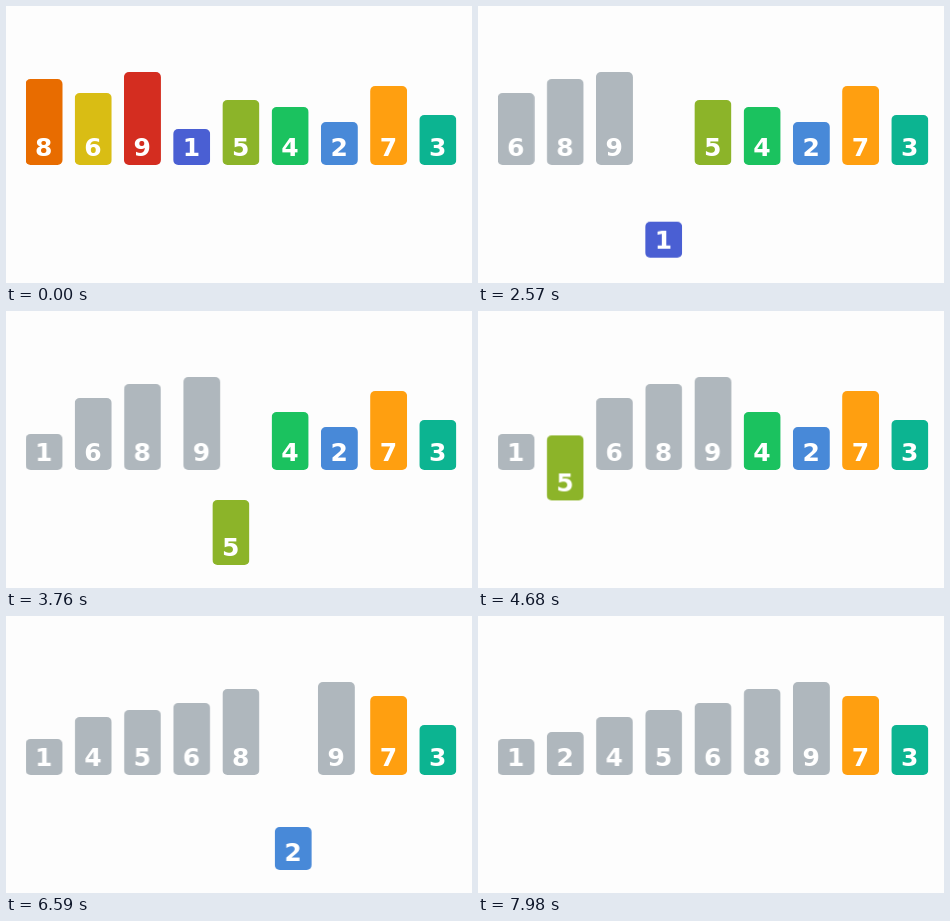
An HTML page that plays this animation: 466x277 px, repeating every 8000 ms.

```html
<!DOCTYPE html>
<html lang="en">
<head>
<meta charset="utf-8">
<title>Insertion sort</title>
<style>
  html, body { margin: 0; width: 100%; height: 100%; overflow: hidden; background: #fdfdfd; }
  #stage { position: relative; width: 466px; height: 277px; overflow: hidden; }
  .bar {
    position: absolute; left: 0; width: 36.6px; border-radius: 5px;
    color: #fff; font: bold 25px/25px "DejaVu Sans", Verdana, sans-serif; text-align: center;
  }
  .bar span { position: absolute; left: 0; right: 0; bottom: 4.5px; }
</style>
</head>
<body>
<div id="stage"></div>
<script>
const LOOP = 8000, GREY = '#afb7bd', EASE = 'cubic-bezier(.37, 0, .63, 1)';
const LEFT = 19.5, PITCH = 49.23, FLOOR = 159, DEPTH = 95;
const DROP = 140, SHIFT = 267, COMPARE = 122, RISE = 125, FADE = 30;

const order = [8, 6, 9, 1, 5, 4, 2, 7, 3];
const colors = {
  1: '#4a5fd3', 2: '#4889d8', 3: '#0cb491', 4: '#1bc25f', 5: '#8cb429',
  6: '#d9bd14', 7: '#ff9f10', 8: '#e86c00', 9: '#d42d20'
};
// Start time of each insertion, for the second bar onwards
const starts = [1390, 1990, 2445, 3541, 4767, 6227];

const stage = document.getElementById('stage');
const bars = {};

order.forEach((n, slot) => {
  const el = document.createElement('div');
  const height = 29 + 7.13 * n;
  el.className = 'bar';
  el.style.height = height + 'px';
  el.style.top = FLOOR - height + 'px';
  el.style.background = colors[n];
  el.innerHTML = `<span>${n}</span>`;
  stage.append(el);
  bars[n] = { el, slot, y: 0, moves: [], fade: null };
  key(bars[n], 0);
});

function key(bar, t) {
  const x = LEFT + bar.slot * PITCH;
  bar.moves.push({
    offset: t / LOOP,
    transform: `translate(${x}px, ${bar.y}px)`,
    easing: EASE
  });
}

// Hold until t, then ease to the new place
function move(bar, t, dur, change) {
  key(bar, t);
  Object.assign(bar, change);
  key(bar, t + dur);
  return t + dur;
}

function insert(list, i, t) {
  const n = list[i], bar = bars[n];
  t = move(bar, t, DROP, { y: DEPTH });
  while (i > 0 && list[i - 1] > n) {
    const other = bars[list[i - 1]];
    move(other, t, SHIFT, { slot: i });
    t = move(bar, t, SHIFT, { slot: i - 1 });
    list[i] = list[i - 1];
    list[--i] = n;
  }
  if (i > 0) t += COMPARE;
  t = move(bar, t, RISE, { y: 0 });
  bar.fade = [t, t + FADE];
}

const list = [...order];
bars[list[0]].fade = [800, 890];
starts.forEach((t, k) => insert(list, k + 1, t));

const timing = { duration: LOOP, iterations: Infinity };
const now = document.timeline.currentTime || 0;

function play(el, frames) {
  el.animate(frames, timing).startTime = now;
}

for (const n of order) {
  const bar = bars[n];
  key(bar, LOOP);
  play(bar.el, bar.moves);
  if (!bar.fade) continue;
  const [from, to] = bar.fade;
  play(bar.el, [
    { offset: 0, backgroundColor: colors[n] },
    { offset: from / LOOP, backgroundColor: colors[n] },
    { offset: to / LOOP, backgroundColor: GREY },
    { offset: 1, backgroundColor: GREY }
  ]);
}
</script>
</body>
</html>
```
